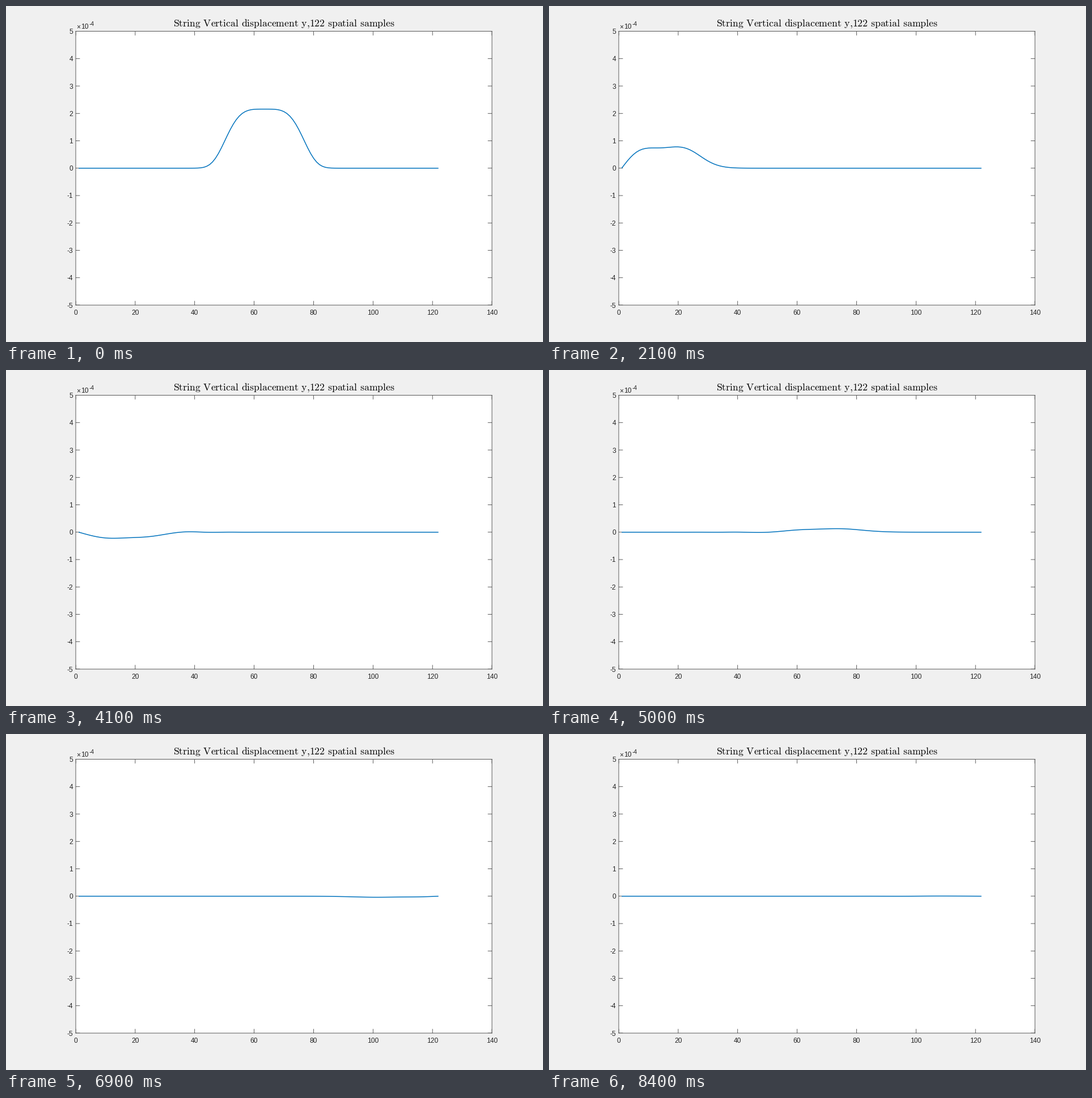
Animation, 947 px wide and 592 px high, one loop 8450 ms. Source, as a matplotlib script:

```python
import numpy as np
import matplotlib.pyplot as plt
from matplotlib.animation import FuncAnimation

WIDTH, HEIGHT, DPI = 947, 592, 100
PT = 72 / DPI  # points per pixel
INK = "#262626"

# String: a one-way pulse on a circle of twice the length; its mirror image
# with opposite sign keeps both ends fixed.
SAMPLES = 122
RING = 2 * (SAMPLES - 1)
PEAK, CENTER, HALF_WIDTH = 2.157, 62.5, 13.03
SPEED = 71.89       # samples per step
LOSS = 0.0317       # damping per step
SMOOTHING = 0.03    # extra damping of short waves
DISPERSION = 0.33   # short waves lag behind

INTERVAL = 50
HOLD = 9            # extra frames on the starting shape
FRAMES = 169

node = np.arange(SAMPLES)
ring = np.arange(RING)
k = 2 * np.pi * np.fft.rfftfreq(RING)
pulse = PEAK * np.exp(-np.log(2) * ((ring - CENTER) / HALF_WIDTH) ** 4)
spectrum = np.fft.rfft(pulse)
rate = -LOSS - SMOOTHING * k**2 + 1j * (DISPERSION * k**3 - SPEED * k)


def displacement(step):
    wave = np.fft.irfft(spectrum * np.exp(rate * step), RING)
    return wave[node] - wave[-node]


plt.rcParams["font.family"] = "Liberation Sans"
fig = plt.figure(figsize=(WIDTH / DPI, HEIGHT / DPI), dpi=DPI, facecolor="#f0f0f0")

left, right, top, bottom = 123.0, 857.0, 44.5, 527.0
ax = fig.add_axes([left / WIDTH, 1 - bottom / HEIGHT,
                   (right - left) / WIDTH, (bottom - top) / HEIGHT])
x_max, y_max = 140, 5
ax.set_xlim(0, x_max)
ax.set_ylim(-y_max, y_max)
xticks = range(0, x_max + 1, 20)
yticks = range(-y_max, y_max + 1)
ax.set_xticks(xticks)
ax.set_yticks(yticks, [str(v) for v in yticks])
ax.tick_params(length=0, labelcolor=INK, labelsize=12 * PT)
ax.tick_params(axis="x", pad=8 * PT)
ax.tick_params(axis="y", pad=5 * PT)

# Frame and inward ticks, kept off the pixel grid
edge = dict(color=INK, linewidth=0.75 * PT, snap=False)
for spine in ax.spines.values():
    spine.set(**edge)
tick_x = 0.01 * x_max
tick_y = tick_x / x_max * (right - left) / (bottom - top) * 2 * y_max
for side in (-1, 1):
    ax.vlines(xticks, side * y_max, side * (y_max - tick_y), zorder=1, **edge)
ax.hlines(yticks, 0, tick_x, zorder=1, **edge)
ax.hlines(yticks, x_max - tick_x, x_max, zorder=1, **edge)


def label(x, y, text, size, color=INK, **style):
    fig.text(x / WIDTH, 1 - y / HEIGHT, text, fontsize=size * PT, color=color,
             va="baseline", **style)


label(123.7, 40.5, "×", 12)
label(132.3, 40.5, "10", 12)
label(147, 35, "-4", 10)

words = "String Vertical displacement y{,}122 spatial samples".split()
title = r"\hspace{0.38}".join(r"\mathrm{%s}" % word for word in words)
label(490.3, 36, f"${title}$", 17.65, "black", ha="center", math_fontfamily="cm")

(string,) = ax.plot(node + 1, displacement(0), color="#0072BD", linewidth=1.5 * PT,
                    solid_capstyle="butt", solid_joinstyle="round")


def update(frame):
    string.set_ydata(displacement(max(0, frame - HOLD)))
    return (string,)


anim = FuncAnimation(fig, update, frames=FRAMES, interval=INTERVAL, repeat=True)
plt.show()
```
